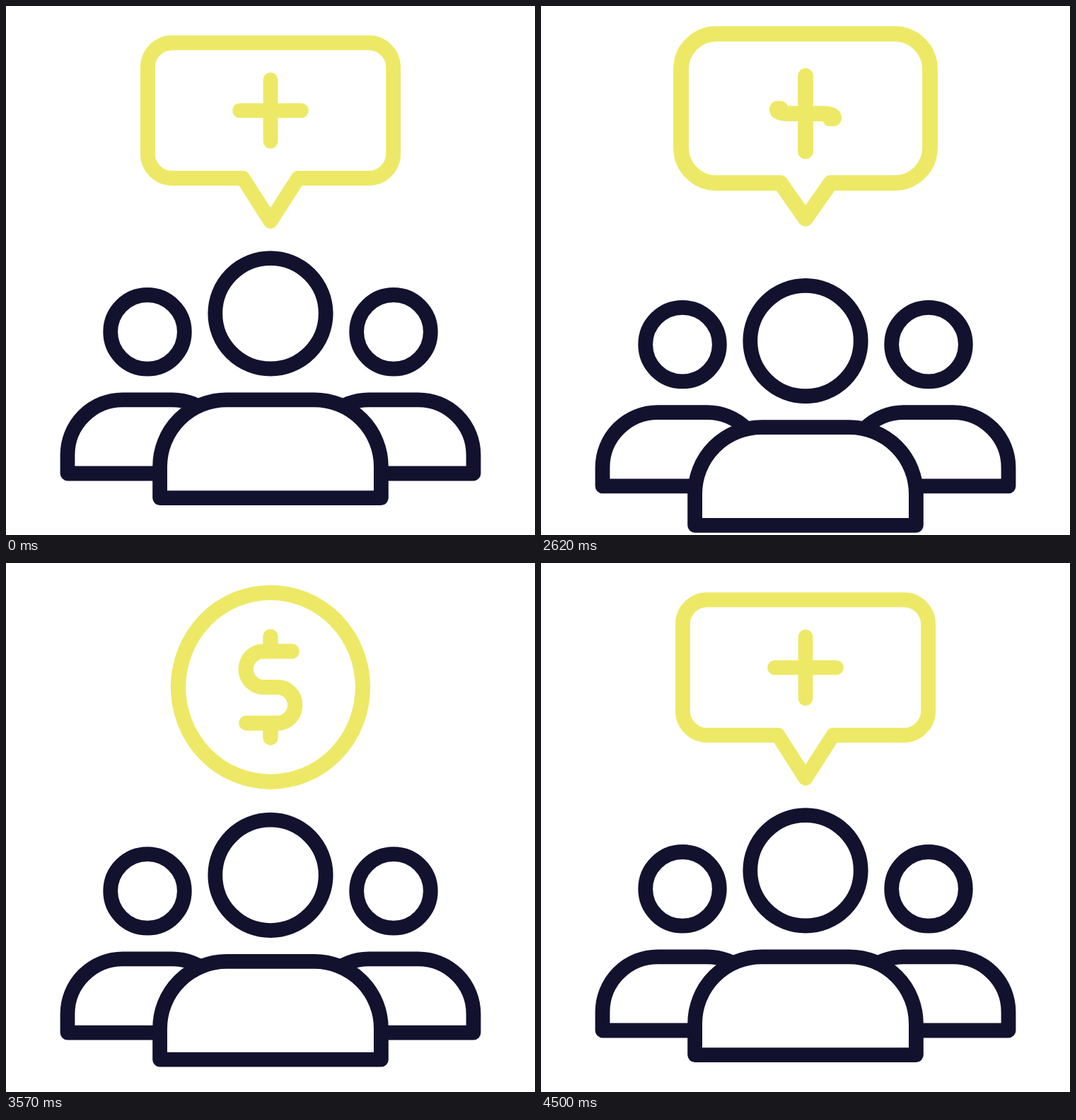
An HTML page with a canvas for the animation above (4520 ms loop, 748 by 748 pixels).

```html
<!DOCTYPE html>
<html>
<head>
<meta charset="utf-8">
<style>
  html, body { margin: 0; height: 100%; overflow: hidden; background: #fff; }
  canvas { display: block; width: 748px; height: 748px; }
</style>
</head>
<body>
<canvas id="stage" width="748" height="748"></canvas>
<script>
const ctx = document.getElementById('stage').getContext('2d');
const LOOP = 4520, START = 2020, CENTER = 374, LINE = 20.8;
const NAVY = '#12122f', YELLOW = '#ede966';

const mix = (a, b, k) => a + (b - a) * k;

// Eased progress from 0 to 1 between two times; x1 and x2 are bezier handles.
function ease(t, from, to, x1 = 1 / 3, x2 = 2 / 3) {
  const u = Math.min(1, Math.max(0, (t - from) / (to - from)));
  let low = 0, high = 1;
  for (let i = 0; i < 22; i++) {
    const s = (low + high) / 2, r = 1 - s;
    if (3 * s * r * r * x1 + 3 * s * s * r * x2 + s * s * s < u) low = s;
    else high = s;
  }
  return low * low * (3 - 2 * low);
}

// Builds a path under a transform, then strokes it with an undistorted line.
function stroke(transform, build, width, color, fill) {
  ctx.save();
  transform();
  ctx.beginPath();
  build();
  ctx.restore();
  if (fill) {
    ctx.fillStyle = fill;
    ctx.fill();
  }
  ctx.lineWidth = width;
  ctx.strokeStyle = color;
  ctx.stroke();
}

function person(x, dy, head, headY, half, top, bottom, radius) {
  const place = () => ctx.translate(x, dy);
  stroke(place, () => ctx.arc(0, headY, head, 0, 7), LINE, NAVY);
  stroke(place, () => {
    ctx.moveTo(-half, bottom);
    ctx.arcTo(-half, top, 0, top, radius);
    ctx.arcTo(half, top, half, bottom, radius);
    ctx.lineTo(half, bottom);
    ctx.closePath();
  }, LINE, NAVY, '#fff');
}

// Speech bubble at k = 0, coin rim at k = 1.
function bubblePath(k) {
  const half = mix(173.6, 130.3, k), top = mix(52, 45.3, k), bottom = mix(243.5, 305.9, k);
  const radius = mix(34.6, 130.3, k) - 0.01, base = 39 * (1 - k), mid = (top + bottom) / 2;
  ctx.moveTo(0, bottom + 60.8 * (1 - k) ** 1.6);
  ctx.lineTo(-base, bottom);
  ctx.arcTo(-half, bottom, -half, mid, radius);
  ctx.arcTo(-half, top, 0, top, radius);
  ctx.arcTo(half, top, half, mid, radius);
  ctx.arcTo(half, bottom, 0, bottom, radius);
  ctx.lineTo(base, bottom);
  ctx.closePath();
}

// Half of the cross bar at k = 0, half of the S at k = 1; side is -1 or 1.
function curlPath(k, side, end) {
  const at = (x0, x1, y) => [side * mix(x0, x1, k), side * y * k];
  ctx.moveTo(0, 0);
  ctx.lineTo(...at(25, 10, 0));
  ctx.bezierCurveTo(...at(30, 23.6, 0), ...at(35, 34.7, 11.1), ...at(38, 34.7, 24.7));
  ctx.bezierCurveTo(...at(39, 34.7, 38.4), ...at(41, 23.6, 49.4), ...at(42, 10, 49.4));
  ctx.lineTo(...at(43.5, end, 49.4));
}

function signPath(curl, bar) {
  for (const side of [-1, 1]) {
    ctx.moveTo(0, side * 49.4 * bar);
    ctx.lineTo(0, side * mix(43.5, 69.6, bar));
    curlPath(curl, side, side < 0 ? -30 : -34);
  }
}

function bubbleScale(t) {
  const stops = [[2003, 1], [2180, 0.75], [2540, 1.073], [2970, 0.82], [3370, 1.057]];
  let scale = 1;
  for (let i = 1; i < stops.length; i++) {
    scale += (stops[i][1] - stops[i - 1][1]) * ease(t, stops[i - 1][0], stops[i][0]);
  }
  return scale - 0.057 * ease(t, 3370, 4000, 0.33, 0.15);
}

function draw(t) {
  if (t < START) t = 0;
  ctx.fillStyle = '#fff';
  ctx.fillRect(0, 0, 748, 748);
  ctx.lineCap = ctx.lineJoin = 'round';

  const drop = 38.8 * (ease(t, 1995, 2560) - ease(t, 2580, 4500, 0.33, 0.15));
  person(200, drop * 0.46, 52.3, 460.8, 113, 556.8, 661, 78);
  person(548, drop * 0.46, 52.3, 460.8, 113, 556.8, 661, 78);
  person(CENTER, drop, 78.2, 434.8, 156.4, 556.8, 695.6, 94.5);

  const turn = ease(t, 3400, 4450);
  const isCoin = turn < 0.5;
  const shape = isCoin ? ease(t, 2510, 2990) : 0;
  const sign = isCoin ? ease(t, 2440, 2960) : 0;
  const scale = bubbleScale(t);
  const anchor = mix(304, 175.6, shape);
  const place = () => {
    ctx.translate(CENTER, anchor);
    ctx.scale(scale * Math.abs(Math.cos(turn * Math.PI)), scale);
    ctx.translate(0, -anchor);
  };
  stroke(place, () => bubblePath(shape), LINE * scale, YELLOW);
  stroke(() => {
    place();
    ctx.translate(0, mix(147.8, 175.6, sign ** 0.75));
    ctx.rotate(Math.PI * ease(t, 1993, 2560) - Math.PI);
  }, () => signPath(shape, sign), LINE * scale, YELLOW);
}

function tick() {
  draw(performance.now() % LOOP);
  requestAnimationFrame(tick);
}
tick();
</script>
</body>
</html>
```
